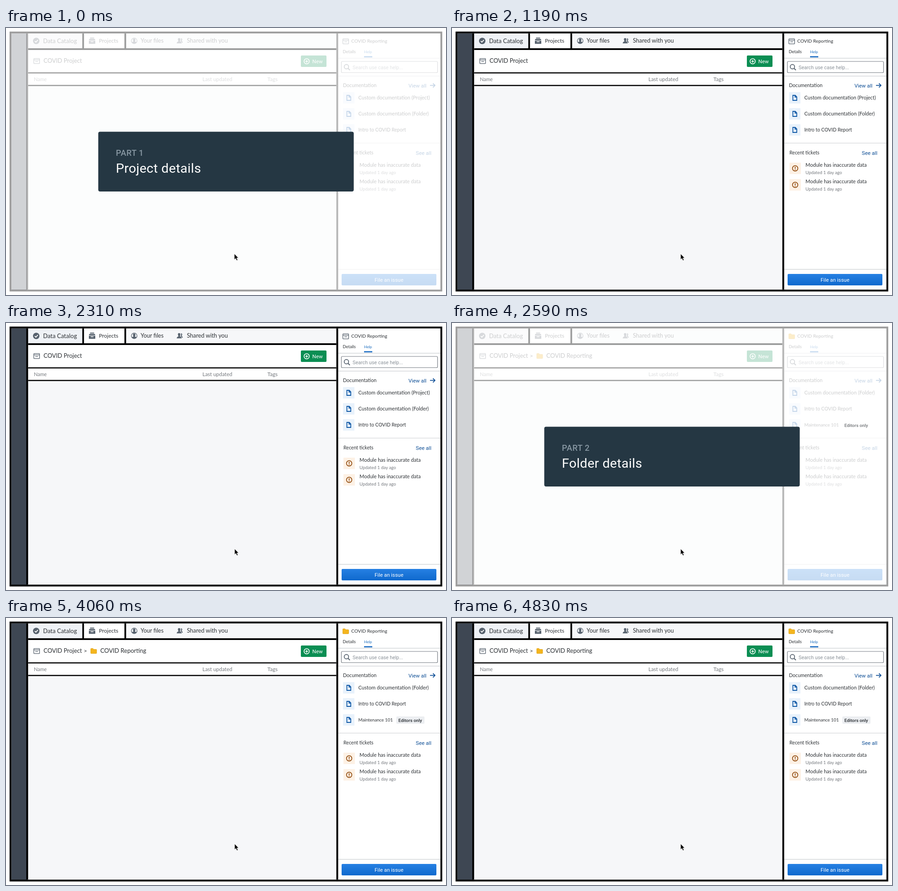
Write an HTML page that moves like this. It is 961x583 px and loops after 5180 ms.

```html
<!DOCTYPE html>
<html lang="en">
<head>
<meta charset="utf-8">
<title>Project and folder details</title>
<style>
  html, body { margin: 0; width: 100%; height: 100%; overflow: hidden; background: #fff; }
  svg { display: block; width: 100%; height: 100%; }
  text { font-family: Lato, sans-serif; fill: #2d3135; white-space: pre; }
  .ui { font-family: Roboto, sans-serif; font-size: 11.4px; fill: #0f4f96; }
  .muted { fill: #74787d; }
  .light { fill: #fff; }
  .rule { stroke: #d5d7da; stroke-width: 1.3; }
  .icon { fill: #56616d; }
  .line { fill: none; stroke: #56616d; stroke-width: 1.3; }
  .faded #content { opacity: .23; }
  .faded #frame { opacity: .38; }
  .faded #columns { opacity: .75; }
  .faded #badge rect { opacity: 0; }
  .faded #badge text { opacity: .65; }
</style>
</head>
<body>
<svg id="stage" viewBox="0 0 961 583">
  <defs>
    <linearGradient id="blue" x2="0" y2="1">
      <stop stop-color="#2680e3"/><stop offset="1" stop-color="#0f69cd"/>
    </linearGradient>
    <g id="project">
      <rect class="line" x=".7" y=".7" width="12.6" height="11" rx="1"/>
      <path class="line" d="M1 3.6h12M4 7.2h6"/>
    </g>
    <path id="folder" fill="#f4b51e" stroke="#d99a0b" stroke-width=".7" d="M.5 1.5q0-1 1-1h4l1.5 2h5.5q1 0 1 1v7q0 1-1 1h-11q-1 0-1-1z"/>
    <g id="doc">
      <rect width="25" height="25" rx="1" fill="#e9f2fb"/>
      <path d="M8.5 7h5.2l3.3 3.4V18H8.500zM13.300 7v3.800H17" fill="none" stroke="#0f58a6" stroke-width="1.800"/>
    </g>
    <g id="ticket">
      <rect width="25" height="25" rx="1" fill="#fdf1e5"/>
      <circle cx="12.500" cy="12.500" r="5.900" fill="none" stroke="#934d10" stroke-width="1.700"/>
      <path d="M12.500 9v4.300m0 1.300v1.700" stroke="#934d10" stroke-width="1.800"/>
      <text x="35" y="-3.500" transform="translate(0 12)" font-size="11.100">Module has inaccurate data</text>
      <text class="muted" x="35" y="25" font-size="9.700">Updated 1 day ago</text>
    </g>
  </defs>

  <g id="content">
    <rect x="12" y="12" width="34" height="560" fill="#3e4753"/>
    <rect x="48" y="12" width="674" height="560" fill="#f6f7f9"/>
    <rect x="48" y="12" width="119" height="33" fill="#eff2f6"/>
    <path d="M170 12h89v33h-89zM48 48h674v77H48zM725 12h224v560H725z" fill="#fff"/>

    <!-- top tabs -->
    <circle class="icon" cx="66" cy="28.300" r="7"/>
    <path d="M62.800 28.500l2.500 2.500 4.300-4.800" fill="none" stroke="#fff" stroke-width="1.800"/>
    <path class="icon" d="M183.500 21h9v2h-9zM182 24h12l1 3h-14zM181 28h14v6.500h-14z"/>
    <path d="M185 30h6" stroke="#fff" stroke-width="1.500"/>
    <circle class="line" cx="280" cy="28" r="6.200"/>
    <path class="icon" d="M280 23q3 0 2.600 3.500-.3 2-1.300 2.800 3 .7 3.500 2.200-2 2.600-4.800 2.600t-4.800-2.600q.5-1.500 3.500-2.200-1-.8-1.300-2.800Q277 23 280 23z"/>
    <path class="icon" d="M378 22q3.200 0 2.800 3.700-.4 2.400-1.300 3.300 4 1 4.300 4.500h-11q.3-3.500 4.200-4.500-1-.9-1.400-3.300Q375 22 378 22zM382 22.500q3-.4 2.700 3-.3 2.300-1.200 3 2.500.8 2.700 3.500h-1.800q-.6-1.800-3-3 1-1.500 1-3.500-.1-1.800-.4-3z"/>
    <text x="81" y="33" font-size="13">Data Catalog</text>
    <text x="203" y="32.300" font-size="11.900">Projects</text>
    <text x="294" y="32.300" font-size="12.500">Your files</text>
    <text x="395" y="32.300" font-size="12.700">Shared with you</text>

    <!-- heading and table -->
    <use href="#project" x="60" y="66"/>
    <text x="82" y="75.500" font-size="12.900">COVID Project</text>
    <g class="folderView">
      <text x="170" y="75.500" font-size="12">&gt;</text>
      <use href="#folder" x="184.500" y="66"/>
      <text x="206" y="75.500" font-size="13">COVID Reporting</text>
    </g>
    <rect x="644" y="60" width="56" height="25" rx="2" fill="#0b8e53"/>
    <circle cx="656.700" cy="72.700" r="5.700" fill="none" stroke="#fff" stroke-width="1.600"/>
    <path d="M653.700 72.700h6m-3-3v6" stroke="#fff" stroke-width="1.600"/>
    <text class="ui light" x="669" y="76.800">New</text>
    <text class="muted" x="61" y="115.500" font-size="10.800">Name</text>
    <text class="muted" x="429" y="115.500" font-size="11.500">Last updated</text>
    <text class="muted" x="571" y="115.500" font-size="11.600">Tags</text>

    <!-- side panel -->
    <use class="projectView" href="#project" x="735" y="23"/>
    <use class="folderView" href="#folder" x="735" y="23"/>
    <text x="754" y="32.300" font-size="10.200">COVID Reporting</text>
    <text x="735.500" y="55" font-size="9.300">Details</text>
    <text x="782" y="55" font-size="8.300" style="fill:#1669bd">Help</text>
    <path class="rule" d="M726 66h223M726 105h223M726 251.300h223M726 527h223"/>
    <rect x="782" y="61.500" width="18" height="2.700" fill="#1f6fc4"/>
    <rect x="732.500" y="73" width="210" height="24.500" rx="2" fill="#fff" stroke="#777d84" stroke-width="1.200"/>
    <circle class="line" cx="743.500" cy="84.500" r="4.800" style="stroke-width:1.700"/>
    <path class="line" d="M747 88l4 4" style="stroke-width:2"/>
    <text class="ui" x="757" y="89.500" style="font-size:10.800px;fill:#8b9299">Search use case help...</text>
    <text x="736" y="129" font-size="10.700">Documentation</text>
    <text class="ui" x="879" y="129.500">View all</text>
    <path d="M926 125.300h11m-4.500-4.500l4.500 4.500-4.500 4.500" fill="none" stroke="#0f4f96" stroke-width="1.700"/>
    <use href="#doc" x="736" y="140"/>
    <use href="#doc" x="736" y="175"/>
    <use href="#doc" x="736" y="210"/>
    <g class="projectView">
      <text x="769.500" y="156" font-size="11">Custom documentation (Project)</text>
      <text x="769.500" y="191" font-size="11.100">Custom documentation (Folder)</text>
      <text x="769.500" y="226" font-size="10.500">Intro to COVID Report</text>
    </g>
    <g class="folderView">
      <text x="769.500" y="156" font-size="11.100">Custom documentation (Folder)</text>
      <text x="769.500" y="191" font-size="10.500">Intro to COVID Report</text>
      <text x="769.500" y="226" font-size="9.800">Maintenance 101</text>
    </g>
    <text x="737" y="276" font-size="10.600">Recent tickets</text>
    <text class="ui" x="895" y="277.300" style="font-size:11.600px">See all</text>
    <use href="#ticket" x="737" y="294"/>
    <use href="#ticket" x="737" y="330"/>
    <rect x="733" y="537" width="207" height="25" rx="2" fill="url(#blue)"/>
    <text class="ui light" x="836.500" y="554" text-anchor="middle">File an issue</text>
  </g>

  <g id="badge" class="folderView">
    <rect x="852.500" y="215" width="61.500" height="16" rx="2" fill="#eceef1"/>
    <text class="ui" x="857" y="226.700" style="font-size:9.800px;font-weight:500;fill:#252a2f">Editors only</text>
  </g>

  <g id="frame" fill="none" stroke="#000">
    <rect x="9.800" y="9.800" width="941" height="563.500" stroke-width="4"/>
    <path id="columns" d="M46.300 11.800v559.500M723.500 11.800v559.500" stroke-width="4"/>
    <path d="M48.300 46.200h673.200M168.500 11.800v32.400M260.500 11.800v32.400" stroke-width="3.700"/>
    <path d="M48.300 98h673.200M48.300 125.500h673.200" stroke-width="2.500"/>
  </g>

  <g id="card">
    <rect x="201.500" y="226.500" width="558" height="130.500" rx="4" fill="#253743"/>
    <text id="part" class="ui" x="240" y="279" style="font-size:18px;font-weight:500;letter-spacing:.5px;fill:#8797a2"></text>
    <text id="title" class="ui light" x="240" y="316" style="font-size:28.300px;letter-spacing:.4px"></text>
  </g>

  <path id="cursor" d="M0 0v12.800l2.900-2.700 2.200 4.700 2.300-1-2.200-4.600H9z" fill="#000" stroke="#fff" stroke-width=".8"/>
</svg>
<script>
  const LOOP = 5180;
  const scenes = [
    { start: 0, card: ["PART 1", "Project details"], folder: false },
    { start: 1190, folder: false },
    { start: 2590, card: ["PART 2", "Folder details"], folder: true },
    { start: 4060, folder: true }
  ];
  const byId = id => document.getElementById(id);
  const show = (element, visible) => { element.style.display = visible ? "" : "none"; };
  const showAll = (selector, visible) =>
    document.querySelectorAll(selector).forEach(element => show(element, visible));

  let current;
  function setScene(scene) {
    if (scene === current) return;
    current = scene;
    byId("stage").classList.toggle("faded", !!scene.card);
    showAll(".projectView", !scene.folder);
    showAll(".folderView", scene.folder);
    show(byId("card"), scene.card);
    if (scene.card) [byId("part").textContent, byId("title").textContent] = scene.card;
  }

  function draw() {
    const time = performance.now() % LOOP;
    setScene(scenes.findLast(scene => scene.start <= time));
    byId("cursor").setAttribute("transform", `translate(${time < 140 ? 498.7 : 499.2} 493)`);
    requestAnimationFrame(draw);
  }
  draw();
</script>
</body>
</html>
```
